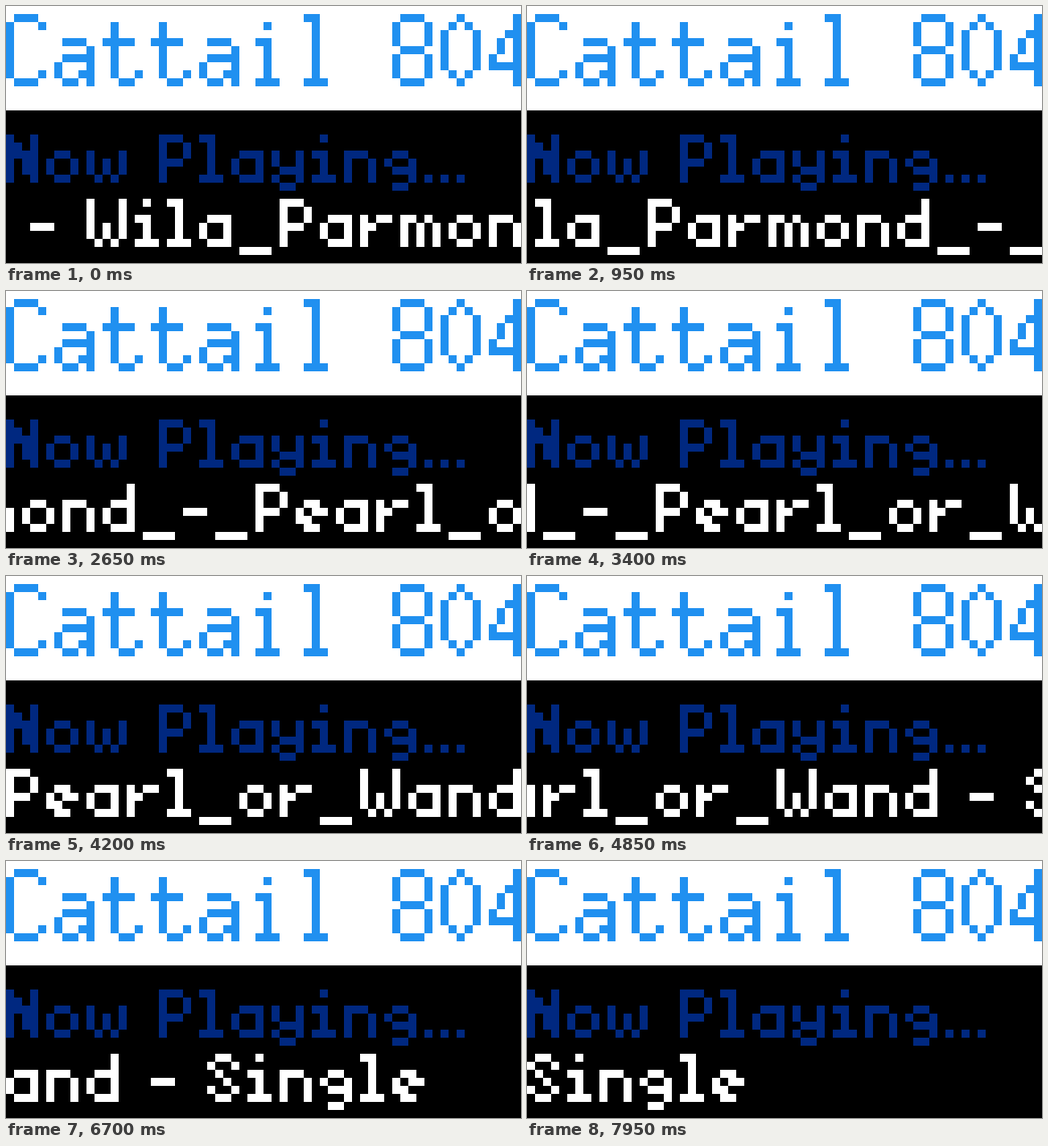
Recreate the animation shown at these times as an HTML page. Size 640 by 320 pixels, loop 8000 ms.

```html
<!DOCTYPE html>
<html lang="en">
<head>
<meta charset="utf-8">
<title>Now Playing</title>
<style>
  html, body { margin: 0; height: 100%; overflow: hidden; background: #000; }
  svg { display: block; width: 100%; height: 100%; }
  path { fill: none; stroke: currentColor; stroke-width: 1; stroke-linecap: square; }
  #station { color: #2090f0; }
  #label { color: #002880; }
  #track { color: #fff; animation: scroll 8s steps(160) infinite; }
  @keyframes scroll { to { transform: translateX(-160px); } }
</style>
</head>
<body>
<svg viewBox="0 0 64 32" shape-rendering="crispEdges" role="img">
  <rect width="64" height="32" fill="#000"/>
  <rect width="64" height="13" fill="#fff"/>
  <g id="station"></g>
  <g id="label"></g>
  <g id="track"></g>
</svg>
<script>
// Glyphs are pen strokes on a one-unit grid, drawn with square caps.
const small = {
  N: 'M0 0v5M1 1v1M2 2v2M3 0v5',
  P: 'M0 0v5M1 0h1M3 1v1M1 3h1',
  S: 'M1 0h1M0 1h0M3 1h0M1 2h0M2 3h0M0 4h0M3 4h0M1 5h1',
  W: 'M0 0v4M2 3v1M4 0v4M1 5h0M3 5h0',
  a: 'M1 2h2v3h-2M0 3v1',
  d: 'M3 0v5h-2M1 2h1M0 3v1',
  e: 'M1 2h1M0 3v1M2 3h1M1 4h0M1 5h1',
  g: 'M1 2h1M3 3v2M0 3h0M1 4h1M1 6h1',
  i: 'M1 0h0M0 2h1v3M0 5h2',
  l: 'M0 0h1v5M0 5h2',
  m: 'M0 2v3M1 2h0M2 3v2M3 2h0M4 3v2',
  n: 'M0 2v3M0 2h2M3 3v2',
  o: 'M1 2h1M0 3v1M3 3v1M1 5h1',
  r: 'M0 2v3M1 3h0M2 2h1',
  w: 'M0 2v2M2 3v1M4 2v2M1 5h0M3 5h0',
  y: 'M0 2v1M3 2v3M1 4h1M0 5h0M1 6h1',
  '.': 'M0 5h0',
  '-': 'M0 3h2',
  '_': 'M0 6h3'
};

const large = {
  C: 'M1 0h2M4 1h0M0 1v6M4 7h0M1 8h2',
  a: 'M1 3h2M4 4v4M1 5h2M0 6v1M3 7h0M1 8h1',
  i: 'M2 1h0M1 3h1v5M1 8h2',
  l: 'M1 0h1v8M1 8h2',
  t: 'M1 1v6M0 3h3M4 7h0M2 8h1',
  0: 'M2 0h0M1 1h0M3 1h0M0 2v4M4 2v4M1 7h0M3 7h0M2 8h0',
  4: 'M3 0v8M2 2h0M1 3v1M0 5v1h4',
  8: 'M1 0h2M0 1v2M4 1v2M1 4h2M0 5v2M4 5v2M1 8h2'
};

const smallWidths = { ' ': 2, '.': 1, '-': 3, i: 3, l: 3, m: 5, w: 5, W: 5 };
const smallAdvance = ch => (smallWidths[ch] || 4) + 1;

function write(id, text, font, advance, x, y) {
  const group = document.getElementById(id);
  group.setAttribute('aria-label', text);
  for (const ch of text) {
    if (font[ch]) {
      const path = document.createElementNS(group.namespaceURI, 'path');
      path.setAttribute('d', font[ch]);
      path.setAttribute('transform', `translate(${x + 0.5} ${y + 0.5})`);
      group.append(path);
    }
    x += advance(ch);
  }
}

write('station', 'Cattail 804', large, () => 6, 0, 1);
write('label', 'Now Playing...', small, smallAdvance, 0, 16);
write('track', '- Wila_Parmond_-_Pearl_or_Wand - Single', small, smallAdvance, 3, 24);
</script>
</body>
</html>
```
